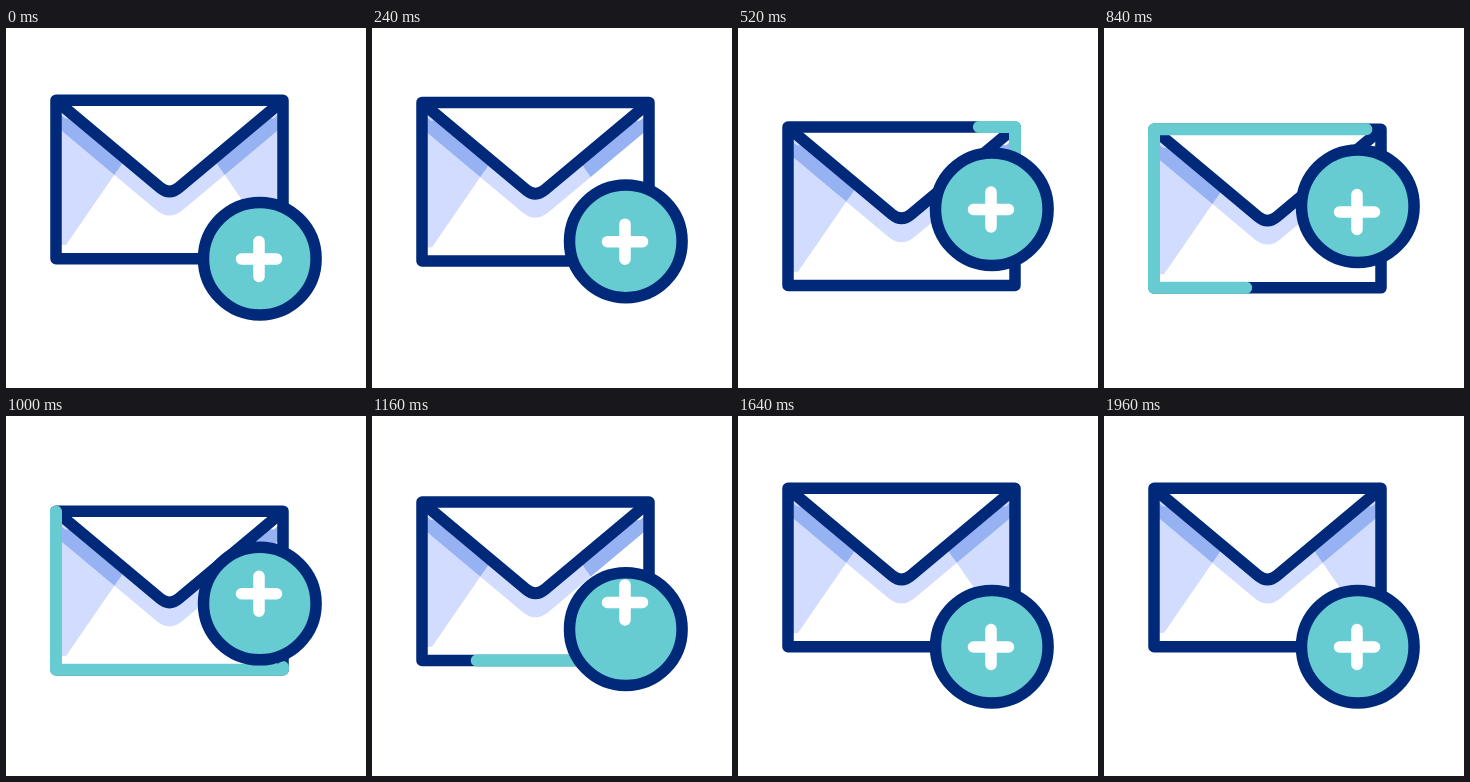
An HTML page for the animation above (2 s loop, 360 by 360 pixels).

```html
<!DOCTYPE html>
<html>
<head>
<meta charset="utf-8">
<style>
  html, body { margin: 0; width: 100%; height: 100%; overflow: hidden; background: #fff; }
  svg { display: block; width: 100vw; height: 100vh; }
  .line { fill: none; stroke: #01297a; stroke-width: 11.5; stroke-linejoin: round; }
</style>
</head>
<body>
<svg viewBox="0 0 360 360">
  <defs>
    <path id="flap" d="M50 72.500L154 159.500Q163.500 167.500 173 159.500L277 72.500"/>
    <path id="left" d="M50 73L135 108L60 217H50Z"/>
    <path id="right" d="M277 73L192 108L267 217H277Z"/>
    <clipPath id="sides"><use href="#left"/><use href="#right"/></clipPath>
  </defs>
  <g id="envelope">
    <rect x="50" y="72.200" width="227" height="158.500" fill="#fff"/>
    <g fill="#d2dcfe">
      <use href="#left"/>
      <use href="#right" id="shade"/>
      <use href="#flap" y="18" stroke="#d2dcfe" stroke-width="11.500"/>
    </g>
    <g clip-path="url(#sides)">
      <use href="#flap" y="18" fill="#97b2f3" stroke="#97b2f3" stroke-width="11.500"/>
    </g>
    <use href="#flap" fill="#fff"/>
    <use href="#flap" class="line"/>
    <rect class="line" x="50" y="72.200" width="227" height="158.500"/>
    <path id="trace" d="M277 152V72.200H50V230.700H277V152" fill="none" stroke="#67ccd1"
      stroke-width="12" stroke-linecap="round" stroke-linejoin="round"/>
  </g>
  <circle id="badge" cx="253.800" cy="230.700" r="56.300" fill="#67ccd1" stroke="#01297a" stroke-width="11.500"/>
  <path id="plus" d="M-17.500 0H17.500M0-17.500V17.500" stroke="#fff" stroke-width="11.500" stroke-linecap="round"/>
</svg>
<script>
const $ = id => document.getElementById(id);
const clamp = (v, lo, hi) => Math.min(hi, Math.max(lo, v));
const smooth = u => u * u * (3 - 2 * u);
const ramp = (t, a, b) => smooth(clamp((t - a) / (b - a), 0, 1));

// Cubic bezier (.25, 0, .25, 1): quick start, long settle
function settle(t, a, b) {
  const x = clamp((t - a) / (b - a), 0, 1);
  let lo = 0, hi = 1;
  for (let i = 0; i < 20; i++) {
    const s = (lo + hi) / 2;
    if (.75 * s * (1 - s) + s ** 3 < x) lo = s; else hi = s;
  }
  return smooth(hi);
}

function draw(t) {
  const drop = 30 * (ramp(t, 167, 611) - ramp(t, 765, 1515));
  const rise = settle(t, 105, 685) - settle(t, 890, 1555);
  const badgeY = -52.5 * rise;

  $("envelope").setAttribute("transform", `translate(0 ${drop})`);
  $("badge").setAttribute("transform", `translate(0 ${badgeY})`);
  $("shade").setAttribute("opacity", clamp(1.3 - rise * 4, 0, 1));

  // The plus crouches, hops against the rim, then spins back to the middle
  const hop = 5.5 * ramp(t, 660, 840) - 32.5 * ramp(t, 860, 1150) + 27 * ramp(t, 1160, 1440);
  const spin = t < 1160 ? 0 : 90 * (1 - ramp(t, 1160, 1440));
  $("plus").setAttribute("transform", `translate(253 ${231 + badgeY + hop}) rotate(${spin})`);

  // Both ends of the trace start and stop behind the badge
  const head = clamp((t - 437) * 1.38, 0, 695);
  const tail = clamp((t - 770) * 1.33, 0, 695);
  const trace = $("trace");
  trace.setAttribute("opacity", head > tail ? 1 : 0);
  trace.setAttribute("stroke-dasharray", `${head - tail} 2000`);
  trace.setAttribute("stroke-dashoffset", -tail);
}

function tick() {
  draw(performance.now() % 2000);
  requestAnimationFrame(tick);
}
tick();
</script>
</body>
</html>
```
